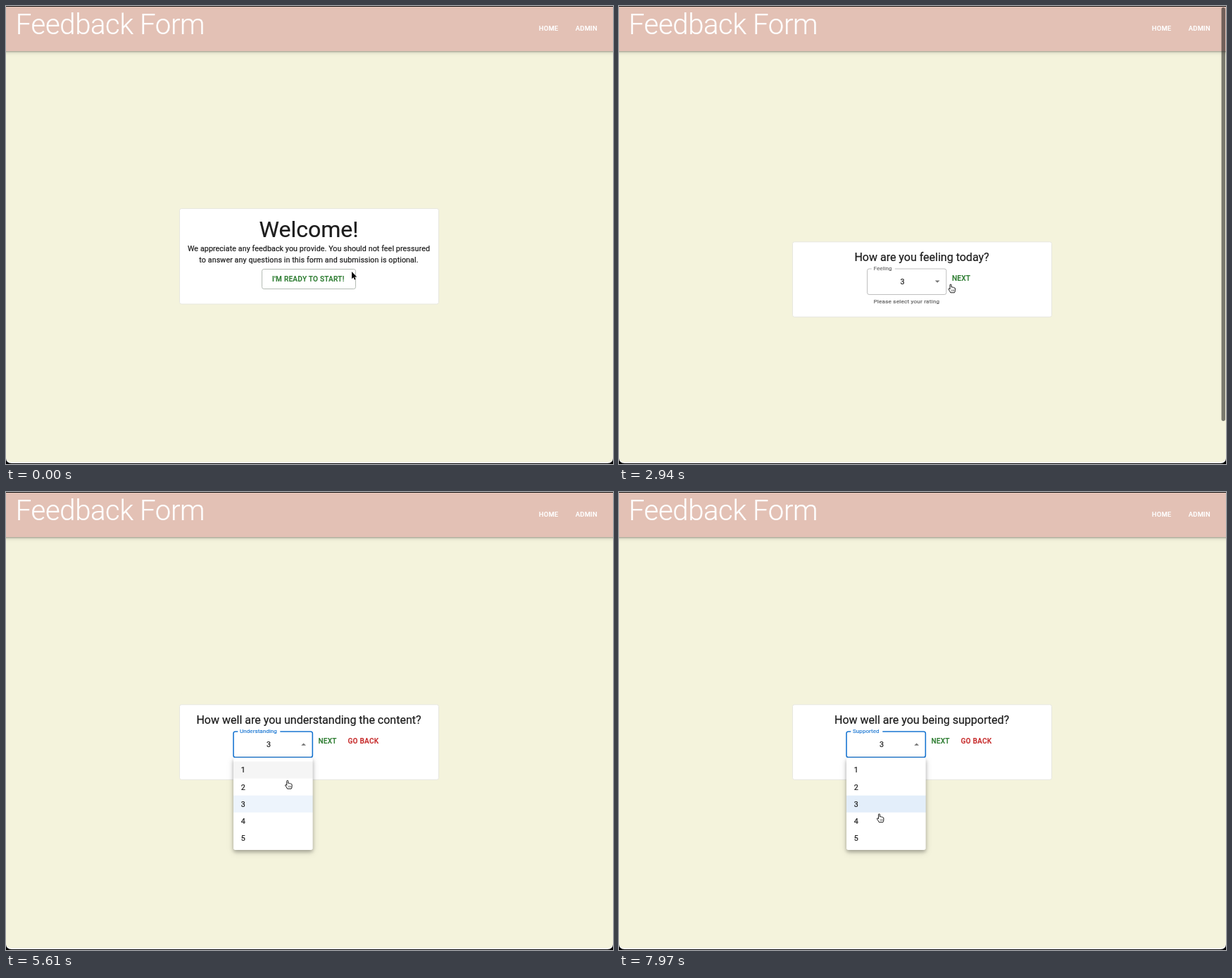
Recreate the animation shown at these times as an HTML page. Size 862 by 650 pixels, loop 8 s.

```html
<!DOCTYPE html>
<html lang="en">
<head>
<meta charset="utf-8">
<title>Feedback Form</title>
<style>
html, body { margin: 0; height: 100%; overflow: hidden; background: #000; }
svg { display: block; font-family: Roboto, sans-serif; }
text { fill: currentColor; stroke: currentColor; stroke-width: .22; }
.bar { filter: drop-shadow(0 1px 1.2px rgba(0,0,0,.3)) drop-shadow(0 1px 3px rgba(0,0,0,.16)); }
.paper { filter: drop-shadow(0 3px 2.5px rgba(0,0,0,.22)) drop-shadow(0 2px 4.5px rgba(0,0,0,.18)); }
</style>
</head>
<body>
<svg width="862" height="650" viewBox="0 0 862 650">
  <path d="M0 1H862V641Q862 649 854 649H8Q0 649 0 641Z" fill="#fff"/>
  <path d="M0 1H862V640Q862 647.5 854 647.5H8Q0 647.5 0 640Z" fill="#f4f3dc"/>
  <rect class="bar" x="-10" y="1" width="882" height="63" fill="#e3c1b5"/>
  <rect width="862" height="1" fill="#111"/>
  <g color="#fff">
    <text x="13.8" y="40" font-size="40" font-weight="300" letter-spacing="-.333">Feedback Form</text>
    <g font-size="9.33" font-weight="500" letter-spacing=".267">
      <text x="756.8" y="35.4">HOME</text>
      <text x="808.8" y="35.4">ADMIN</text>
    </g>
  </g>
  <g id="page"></g>
</svg>
<script>
const LOOP = 8000, CLICK = 160;
const INK = '#1c1c1c', GREEN = '#2e7d32', RED = '#c62828', BLUE = '#1976d2';
const START = 2150;

const questions = [
  { at: START + CLICK, title: 'How are you feeling today?', label: 'Feeling',
    gap: 33, dx: 29.5, dy: 33, open: 3330, close: 4120 },
  { at: 4700, title: 'How well are you understanding the content?', label: 'Understanding',
    gap: 60, dx: 0, dy: 0, open: 5250, close: 5880 },
  { at: 6920, title: 'How well are you being supported?', label: 'Supported',
    gap: 45, dx: 0, dy: 0, open: 7320, close: Infinity },
];

// pointer stops: time, x, y
const stops = [
  [0, 491, 377], [480, 438, 385], [760, 467, 384], [1000, 467, 384], [1180, 497.8, 377],
  [1580, 497.8, 377], [1820, 450, 385], [2500, 450, 385], [2860, 471, 395], [2940, 471, 395],
  [3120, 441, 398], [3420, 441, 398], [3850, 412, 472], [4200, 412, 472], [4500, 489, 393],
  [4710, 489, 393], [4910, 452, 368], [5120, 425, 362], [5300, 425, 362], [5440, 413, 360],
  [5730, 392, 438], [6100, 392, 438], [6600, 462.5, 353.5], [6920, 462.5, 353.5],
  [7150, 400, 360], [7350, 395, 357], [7600, 395, 357], [8080, 365.6, 472],
];

const clamp = v => Math.max(0, Math.min(1, v));
const mix = (a, b, p) => a + (b - a) * p;
const easeOut = v => 1 - (1 - clamp(v)) ** 3;
const smooth = v => v * v * (3 - 2 * v);

function pointer(t) {
  const i = stops.findIndex(s => s[0] > t);
  const [t0, x0, y0] = stops[i - 1], [t1, x1, y1] = stops[i];
  const p = smooth((t - t0) / (t1 - t0));
  return { x: mix(x0, x1, p), y: mix(y0, y1, p) };
}

const text = (x, y, str, size, color, more = '') =>
  `<text x="${x}" y="${y}" font-size="${size}" color="${color}" ${more}>${str}</text>`;
const body = (x, y, str, more = '') => text(x, y, str, 10.67, INK, `letter-spacing=".11" ${more}`);
const button = (x, y, str, color) => text(x, y, str, 10, color, 'font-weight="500" letter-spacing=".286"');
const middle = 'text-anchor="middle"';
const card = (y, h) =>
  `<rect x="246.5" y="${y}" width="368" height="${h}" rx="2.7" fill="#fff" stroke="#e7e7df"/>`;

function ripple(t, x, y, w, h, at) {
  if (t < 0) return '';
  const p = easeOut(t / 550);
  return `<svg x="${x}" y="${y}" width="${w}" height="${h}"><circle cx="${at.x - x}" cy="${at.y - y}"
    r="${w * p}" fill="${GREEN}" opacity="${.1 + .2 * p}"/></svg>`;
}

function welcome(t, at) {
  const hover = clamp((t - 1620) / 200);
  return card(287.5, 135.5)
    + text(430, 328, 'Welcome!', 32, INK, middle)
    + body(430, 347.7, 'We appreciate any feedback you provide. You should not feel pressured', middle)
    + body(430, 363.7, 'to answer any questions in this form and submission is optional.', middle)
    + `<rect x="363.5" y="373.5" width="133" height="28" rx="2.7" fill="${GREEN}" fill-opacity="${.05 * hover}"
        stroke="${hover ? GREEN : '#b4bbb4'}"/>`
    + ripple(t - START, 364, 374, 132, 27, at)
    + button(378, 391, 'I\'M READY TO START!', GREEN);
}

function menu(q, t) {
  const shown = easeOut((t - q.open) / 230) * (1 - easeOut((t - q.close) / 200));
  if (!shown) return '';
  const late = pointer(Math.max(0, t - 40));
  const row = Math.floor((late.y - q.dy - 382.5) / 24.1);
  let rows = '';
  for (let i = 0; i < 5; i++) {
    const over = i === row, y = 382.5 + 24.1 * i;
    const fill = i === 2 ? BLUE : '#000';
    const alpha = i === 2 ? (over ? .12 : .08) : over ? .04 : 0;
    rows += `<rect x="323" y="${y}" width="112.6" height="24.1" fill="${fill}" fill-opacity="${alpha}"/>`
      + body(333.8, y + 15.9, i + 1);
  }
  const sx = mix(.75, 1, shown), sy = mix(.5625, 1, shown);
  return `<g opacity="${shown}" transform="translate(379 377.3) scale(${sx} ${sy}) translate(-379 -377.3)">
    <rect class="paper" x="323" y="377.3" width="112.6" height="130.7" rx="2.7" fill="#fff"/>${rows}</g>`;
}

function question(i, t, at) {
  const q = questions[i], next = questions[i + 1];
  const click = next ? next.at - CLICK : Infinity;
  const focus = t >= q.open && t < click, open = focus && t < q.close;
  const x = at.x - q.dx, y = at.y - q.dy;
  const hover = x > 323 && x < 436 && y > 340 && y < 377;
  const p = easeOut((t - q.at) / 200);
  const line = focus ? `stroke="${BLUE}" stroke-width="1.6"`
    : `stroke="#000" stroke-opacity="${hover ? .87 : .25}"`;
  return `<g transform="translate(0 ${q.dy})">${card(301.8, 106.5)}`
    + text(430, 328.7, q.title, 16, INK, middle)
    + `</g><g transform="translate(${q.dx} ${q.dy})">`
    + `<rect x="323" y="340" width="112.3" height="36.5" rx="2.7" fill="none" ${line}/>`
    + `<path d="M329.3 340h${q.gap * p}" stroke="#fff" stroke-width="3"/>`
    + body(373, 362.2, 3, middle)
    + `<path d="M419.2 ${open ? '359.8l3.4-3.4 3.4 3.4' : '356.4l3.4 3.4 3.4-3.4'}z" fill="#000" fill-opacity=".54"/>`
    + `<g transform="translate(332 ${mix(361.7, 342.2, p)}) scale(${mix(1, .75, p)})">`
    + text(0, 0, q.label, 10.67, focus ? BLUE : '#666', 'letter-spacing=".1"') + '</g>'
    + text(332, 389, 'Please select your rating', 8, '#666', 'letter-spacing=".267"')
    + ripple(t - click, 436.5, 339, 41, 28, { x, y })
    + button(443.4, 356.8, 'NEXT', GREEN)
    + (i ? button(485.4, 356.8, 'GO BACK', RED) : '')
    + menu(q, t) + '</g>';
}

function scrollbar(t) {
  const first = questions[0];
  const on = t >= first.at && t < first.open || t >= first.close + 130 && t < questions[1].at;
  return on ? '<rect x="855.5" y="2" width="5.5" height="587" rx="2.7" opacity=".5"/>' : '';
}

function cursor(t, { x, y }) {
  const hand = t > 1640 && !(t >= 4700 && t < 4980);
  const shape = hand
    ? '<path d="M-1 1Q-1 0 0 0T1 1V4q1-.6 1.8.2 1.3-.4 1.8.6 1.6-.2 1.8 1.2V8.5Q6.4 10.5 5.4 11.8H-.2Q-1.2 9.5-2.8 7.6-3.6 6.3-2.5 6-1.6 5.9-1 7Z" fill="#fff" stroke="#000" stroke-width=".9"/><path d="M1.6 7.5v2.4M3.2 7.5v2.4M4.7 7.5v2.4" stroke="#000" stroke-width=".5"/>'
    : '<path d="M0 0V10.2L2.3 8 3.9 11.6 5.6 10.9 4 7.4H7.2Z" stroke="#fff" stroke-width="1" paint-order="stroke"/>';
  return `<g transform="translate(${x} ${y})">${shape}</g>`;
}

const page = document.getElementById('page');
function draw() {
  const t = performance.now() % LOOP, at = pointer(t);
  const i = questions.filter(q => t >= q.at).length - 1;
  page.innerHTML = (i < 0 ? welcome(t, at) : question(i, t, at)) + scrollbar(t) + cursor(t, at);
  requestAnimationFrame(draw);
}
draw();
</script>
</body>
</html>
```
